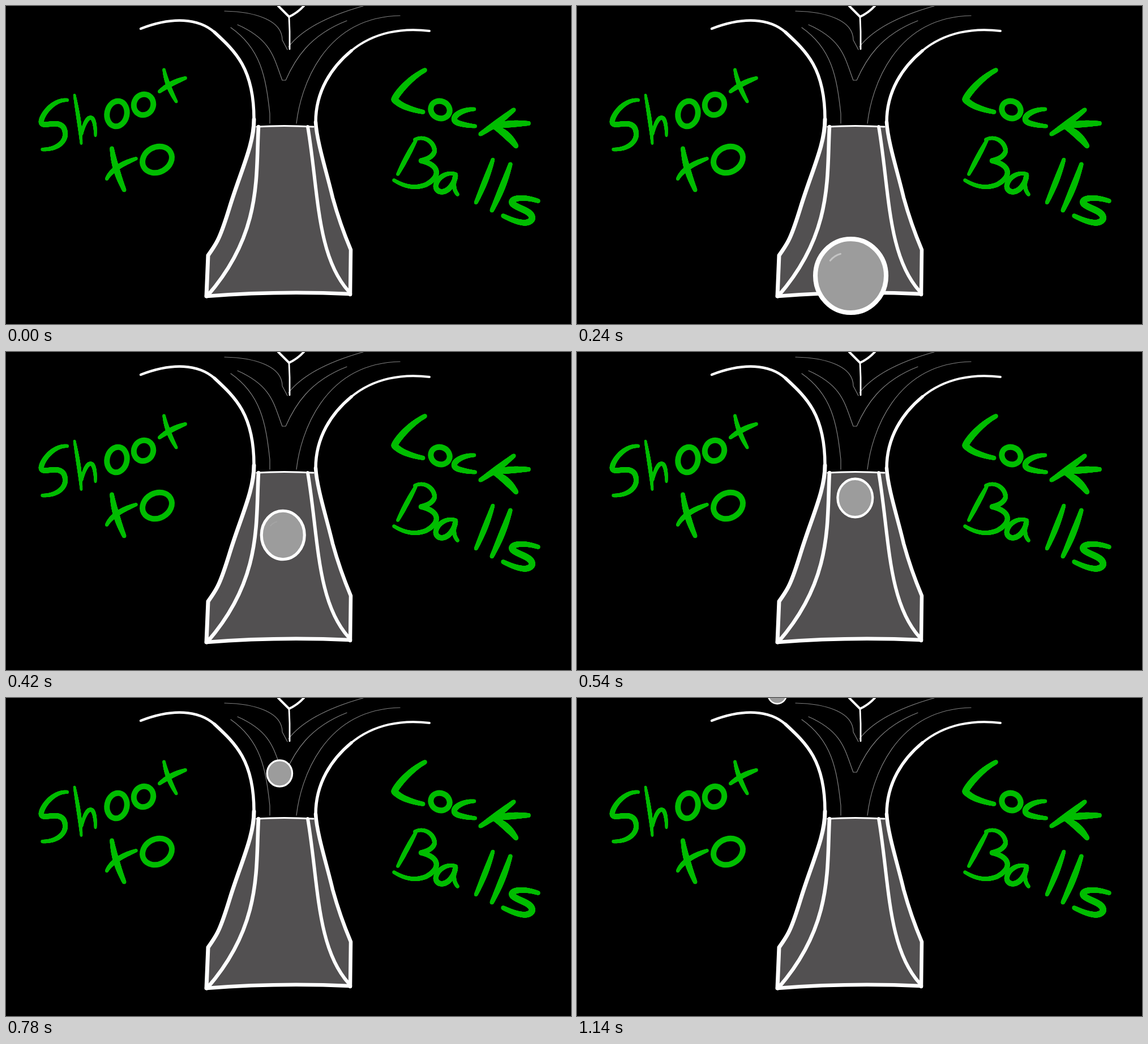
An HTML page with a canvas for the animation above (1.2 s loop, 998 by 561 pixels).

```html
<!DOCTYPE html>
<html lang="en">
<head>
<meta charset="utf-8">
<title>Shoot to Lock Balls</title>
<style>
  html, body { margin: 0; width: 100%; height: 100%; overflow: hidden; background: #000; }
  canvas, svg { position: absolute; left: 0; top: 0; }
</style>
</head>
<body>
<canvas id="scene" width="998" height="561"></canvas>
<svg width="998" height="561" viewBox="0 0 998 561">
  <ellipse id="ball" fill="#9c9c9c" stroke="#fff"/>
  <path id="shine" d="M-.58 -.43Q-.47 -.57 -.29 -.62" fill="none" stroke="#c4c4c4" stroke-width=".05" stroke-linecap="round"/>
</svg>
<script>
const ctx = document.getElementById('scene').getContext('2d');
const ball = document.getElementById('ball');
const shine = document.getElementById('shine');
const GREEN = '#00bd00';

function line(color, width, d) {
  ctx.strokeStyle = color;
  ctx.lineWidth = width;
  ctx.lineCap = ctx.lineJoin = 'round';
  ctx.stroke(new Path2D(d));
}

const chalk = (width, d) => line('#fff', width, d);
const pencil = d => line('#808080', 1.2, d);

// Brush stroke that is thickest in the middle
function ink(width, d) {
  const path = document.createElementNS('http://www.w3.org/2000/svg', 'path');
  path.setAttribute('d', d);
  const length = path.getTotalLength();
  ctx.fillStyle = GREEN;
  for (let s = 0; s <= length; s += 0.5) {
    const { x, y } = path.getPointAtLength(s);
    ctx.beginPath();
    ctx.arc(x, y, width / 2 * (0.65 + 0.35 * Math.sin(Math.PI * s / length)), 0, 7);
    ctx.fill();
  }
}

function ring(x, y, rx, ry, turn) {
  ctx.strokeStyle = GREEN;
  ctx.lineWidth = 10;
  ctx.beginPath();
  ctx.ellipse(x, y, rx, ry, turn, 0, 7);
  ctx.stroke();
}

function drawRamp() {
  const left = 'C438 245 415 290 395 355S370 420 357 440L354 512';
  const right = 'C549 240 567 295 577 338Q590 385 609 430L608 509';
  const floor = 'M354 512Q480 502 608 508';
  ctx.fillStyle = '#525051';
  ctx.fill(new Path2D('M438 212' + left + 'L500 450L445 212Z'));
  ctx.fill(new Path2D('M547 212' + right + 'Q480 502 354 512L445 212Z'));

  pencil('M386 9C440 10 488 25 488 60L497 77');
  pencil('M499 72C520 45 560 20 631 0');
  pencil('M409 33C470 60 473 92 488 131H494C510 95 535 52 602 26');
  pencil('M397 38C450 75 459 125 466 190V207');
  pencil('M513 207C520 145 560 20 696 17');

  chalk(4, 'M481 0L500 19Q515 12 526 0');
  chalk(2.8, 'M500 20L501 45V76');
  chalk(3, 'M443 213Q490 210 543 213');
  chalk(4.5, 'M238 40C295 18 340 22 368 46');
  chalk(5.5, 'M368 46C405 80 438 110 438 200');
  chalk(7, 'M438 200' + left);
  chalk(4, 'M748 44C700 38 650 46 610 79');
  chalk(5.5, 'M610 79C575 108 547 150 547 205');
  chalk(6.5, 'M547 205' + right);
  chalk(6.5, floor);
  chalk(6.5, 'M446 213C441 300 453 400 356 511');
  chalk(6, 'M533 213C552 325 548 440 605 503');
}

function drawWords() {
  // Shoot
  ink(9.5, 'M108 166C80 164 58 200 63 207S92 200 102 215C112 236 92 254 64 253');
  ink(7, 'M121 157C125 180 131 210 133 243');
  ink(7, 'M134 226C139 196 158 178 158 229');
  ring(196, 190, 17.5, 22.5, 0.2);
  ring(243, 174, 17, 18.5, 0.4);
  ink(8, 'M279 112Q284 140 301 169');
  ink(9, 'M271 151Q290 136 317 127');

  // to
  ink(11, 'M187 251Q192 288 209 325');
  ink(9, 'M178 305Q188 284 230 269');
  ring(267, 271, 27, 22, -0.5);

  // Lock
  ink(11.5, 'M740 113C712 128 690 155 686 165Q700 180 737 187');
  ring(767, 183, 17, 15, 0.4);
  ink(10, 'M827 182C802 182 779 200 800 207Q814 211 829 212');
  ink(11, 'M897 183Q868 207 838 226');
  ink(12, 'M923 207Q890 207 858 212');
  ink(13, 'M864 214Q885 225 901 247');

  // Balls
  ink(8.5, 'M724 237Q706 270 692 297');
  ink(9, 'M722 236C738 227 757 240 757 256Q754 268 733 273C765 280 770 300 742 315Q715 326 685 307');
  ink(9.5, 'M795 297C772 288 748 318 765 327C780 332 793 312 794 299Q787 320 798 333');
  ink(10, 'M860 271Q848 308 830 347');
  ink(11, 'M891 279Q878 320 858 361');
  ink(11.5, 'M940 344C910 334 888 340 895 349C905 358 932 362 929 376Q920 391 878 370');
}

// time, height on stage, radius
const flight = [
  [0, 720, 92], [120, 596, 80], [240, 476, 62.5], [420, 323, 38],
  [660, 200, 26.5], [900, 71.5, 19], [1140, -7, 16.5]
];

// Smooth curve through the keys of one column
function at(keys, t, col) {
  const i = Math.max(1, keys.findIndex(k => k[0] >= t));
  const a = keys[i - 1], b = keys[i], span = b[0] - a[0];
  const slope = (p, q) => (q[col] - p[col]) / (q[0] - p[0]) * span;
  const m0 = slope(keys[Math.max(i - 2, 0)], b);
  const m1 = slope(a, keys[Math.min(i + 1, keys.length - 1)]);
  const u = (t - a[0]) / span, v = 1 - u;
  return a[col] * v * v * (1 + 2 * u) + m0 * u * v * v + b[col] * u * u * (3 - 2 * u) - m1 * u * u * v;
}

function moveBall(now) {
  const t = Math.floor(now % 1200 / 60) * 60;
  const turn = t - 660; // after this the ball veers left
  const x = 492 - turn * turn * (turn > 0 ? 6e-4 : 4.8e-5);
  const y = at(flight, t, 1), r = at(flight, t, 2);
  const stretch = 1.04 + 0.1 * Math.exp(-(((t - 460) / 100) ** 2));
  const values = { cx: x, cy: y, rx: r, ry: r * stretch, 'stroke-width': Math.min(9, 0.6 + 0.12 * r) };
  for (const name in values) ball.setAttribute(name, values[name]);
  shine.setAttribute('transform', `translate(${x} ${y}) scale(${r})`);
  shine.setAttribute('opacity', Math.min(Math.max((r - 32) / 25, 0), 1));
  requestAnimationFrame(moveBall);
}

drawRamp();
drawWords();
requestAnimationFrame(moveBall);
</script>
</body>
</html>
```
